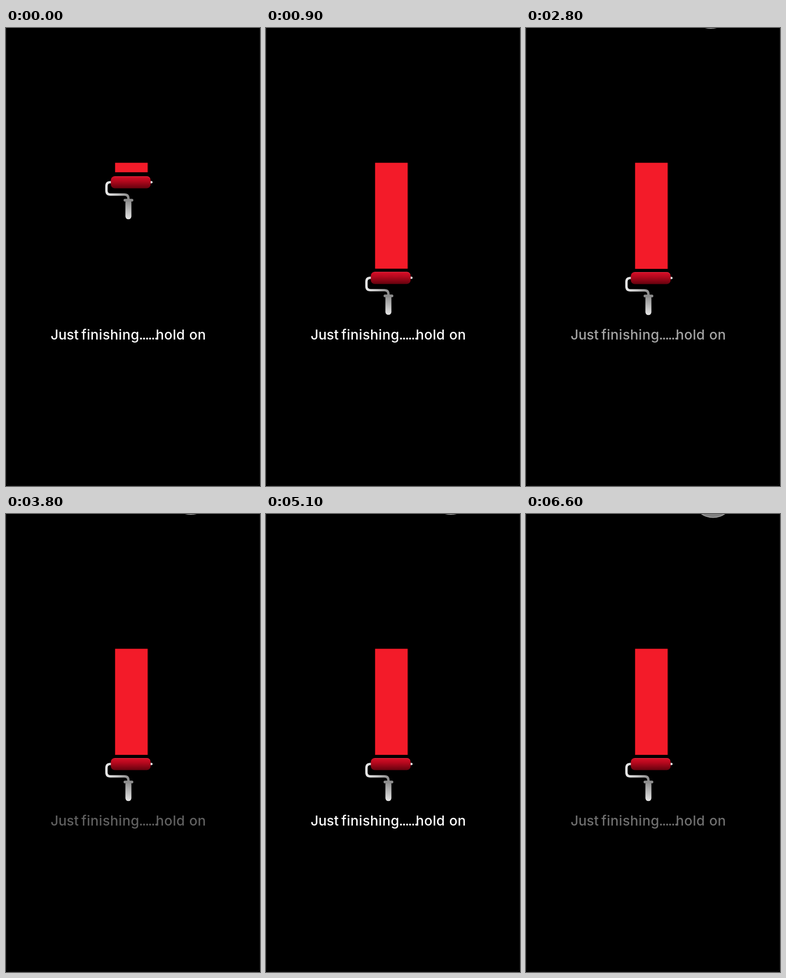
An HTML page for the animation above (6700 ms loop, 558 by 1004 pixels).

```html
<!DOCTYPE html>
<html lang="en">
<head>
<meta charset="utf-8">
<title>Just finishing</title>
<style>
  html, body { margin: 0; width: 100%; height: 100%; overflow: hidden; background: #000; }
  svg { display: block; width: 100%; height: 100%; }
  text { font: 500 30px Inter, "Open Sans", sans-serif; fill: #fff; }
  .wide { letter-spacing: .5px; }
  .dots { letter-spacing: -2.4px; }
</style>
</head>
<body>
<svg viewBox="0 0 558 1004">
  <defs>
    <linearGradient id="sleeve" x2="0" y2="1">
      <stop stop-color="#d90f28"/>
      <stop offset=".4" stop-color="#b4081d"/>
      <stop offset="1" stop-color="#64020e"/>
    </linearGradient>
    <linearGradient id="wire" gradientUnits="userSpaceOnUse" x1="218" x2="272">
      <stop stop-color="#ececec"/>
      <stop offset=".5" stop-color="#c4c4c4"/>
      <stop offset="1" stop-color="#858585"/>
    </linearGradient>
    <linearGradient id="grip" x2="0" y2="1">
      <stop stop-color="#8a8a8a"/>
      <stop offset="1" stop-color="#e6e6e6"/>
    </linearGradient>
  </defs>
  <rect width="558" height="1004"/>
  <rect x=".5" y="-20" width="557" height="1023" rx="8" fill="none" stroke="#121212"/>

  <circle id="touch" cx="406" cy="-60" r="45.5" fill="#808080" stroke="#a6a6a6" stroke-width="1.5"/>

  <g id="paint">
    <rect x="239.7" y="295.5" width="73" height="20.7" fill="#3c060a"/>
    <rect x="239.7" y="295.5" width="71.2" height="20.7" fill="#f31b29"/>
  </g>

  <g id="roller">
    <path d="M316 338H319.5" stroke="#e4e4e4" stroke-width="5" stroke-linecap="round"/>
    <path d="M232 338H229.5Q220.7 338 220.7 346.5V356.5Q220.7 365.2 229.5 365.2H260Q269 365.2 269 374V378"
          fill="none" stroke="url(#wire)" stroke-width="5.2"/>
    <rect x="262.3" y="376" width="13.2" height="43.3" rx="6.5" fill="url(#grip)"/>
    <rect x="258.3" y="374.6" width="21.4" height="6" rx="3" fill="#8c8c8c"/>
    <rect x="230.3" y="325" width="87.4" height="26.6" rx="8.5" fill="url(#sleeve)"/>
    <path d="M238 325.6H310Q315 326 316.6 330" fill="none" stroke="#f0485a" stroke-opacity=".6"/>
  </g>

  <g id="message">
    <text x="98" y="683">Just</text>
    <text x="165.5" y="683" class="wide">finishing</text>
    <text x="292" y="683" class="dots">......</text>
    <text x="329" y="683" class="wide">hold</text>
    <text x="402.5" y="683" class="wide">on</text>
  </g>
</svg>
<script>
  const LOOP = 6700, STEP = 100, FADE = 250;
  // The message alternately fades out and in at these moments.
  const fades = [1130, 1616, 2130, 2700, 3230, 3748, 4300, 4830, 5400, 5930, 6514];
  // Touch dot: [time, centre x, lower edge].
  const touches = [[0, 406, -10], [1700, 406, .9], [1900, 406, 1.3], [2300, 406, 1.8],
                   [6100, 407, 3.5], [6300, 409, 5.5], [6500, 410, 7], [6600, 411, 8.5]];

  const byId = id => document.getElementById(id);
  const [touch, paint, roller, message] = ['touch', 'paint', 'roller', 'message'].map(byId);
  const clamp = x => Math.min(1, Math.max(0, x));
  const easeOut = (x, power) => 1 - (1 - clamp(x)) ** power;

  function messageOpacity(t) {
    const last = fades.findLastIndex(start => start <= t);
    if (last < 0) return 1;
    let p = easeOut((t - fades[last]) / FADE, 2);
    if (p > .95) p = 1;
    return last % 2 ? p : 1 - p;
  }

  function draw(t) {
    const p = easeOut((t - 220) / 780, 3);
    roller.setAttribute('transform', `translate(0 ${210 * p})`);
    for (const bar of paint.children) bar.setAttribute('height', 20.7 + 211.8 * p);

    message.setAttribute('opacity', messageOpacity(t));

    const [, x, edge] = touches.findLast(([start]) => start <= t);
    touch.setAttribute('cx', x);
    touch.setAttribute('cy', edge - 46.25);
  }

  const begin = performance.now();
  function tick() {
    const t = (performance.now() - begin) % LOOP;
    draw(Math.floor(t / STEP) * STEP);
    requestAnimationFrame(tick);
  }
  tick();
</script>
</body>
</html>
```
